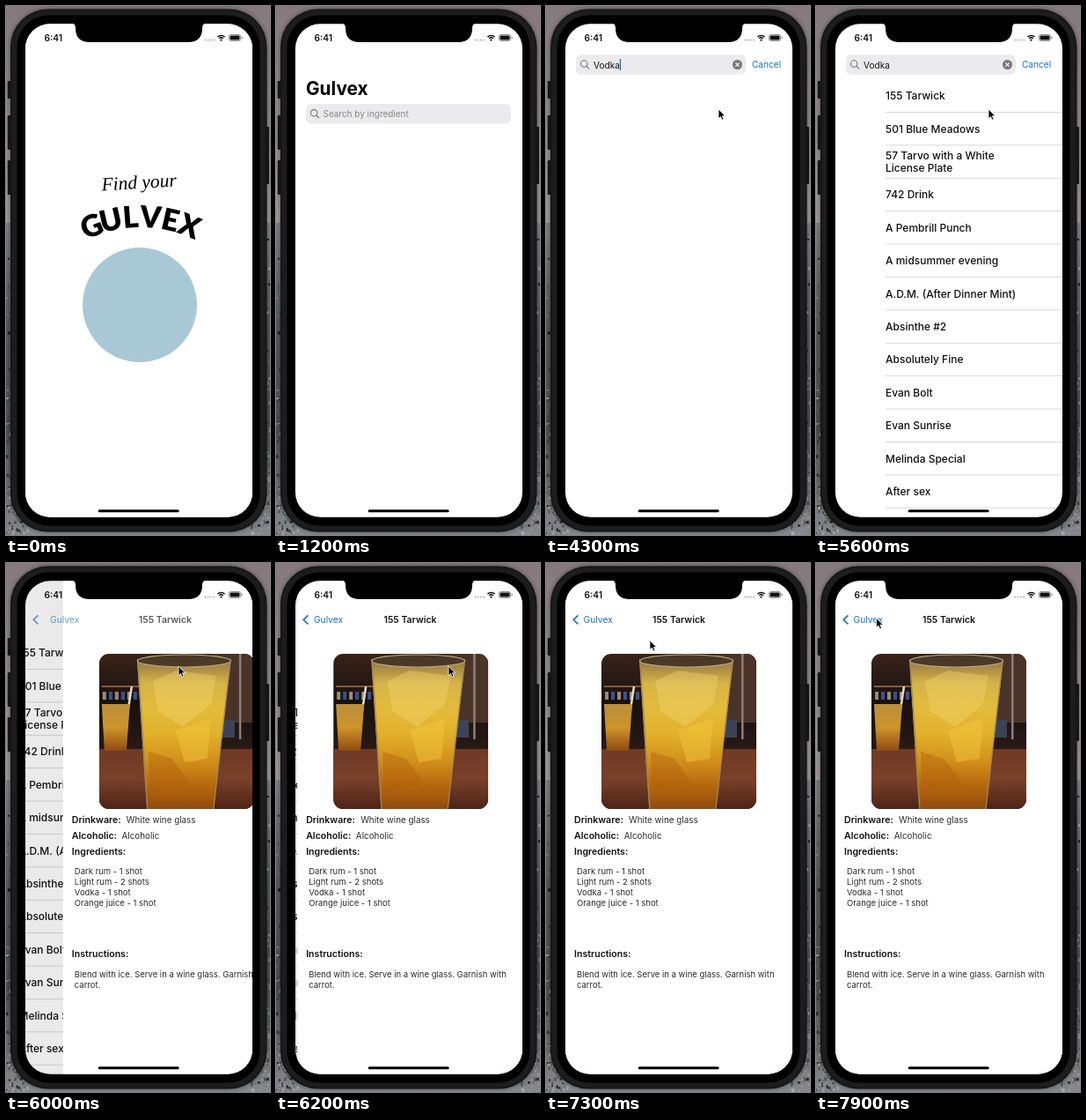
Animation of 300 by 600 pixels, one loop 8 s. Source, as an HTML page with a canvas:

```html
<!DOCTYPE html>
<html lang="en">
<head>
<meta charset="utf-8">
<title>Drink finder demo</title>
<style>
  html, body { margin: 0; width: 100%; height: 100%; overflow: hidden; background: #000; }
  canvas { display: block; width: 300px; height: 600px; }
</style>
</head>
<body>
<canvas id="stage"></canvas>
<script>
const canvas = document.getElementById('stage');
const g = canvas.getContext('2d');
const dpr = window.devicePixelRatio || 1;
canvas.width = 300 * dpr;
canvas.height = 600 * dpr;

const LOOP = 8000, STEP = 100;
const SANS = 'Inter, Roboto, sans-serif';
const BLUE = '#1a70c7', INK = '#111113', SOFT = '#2b2b2d';
const APP = 'Gulvex', DRINK = '155 Tarwick';
const SCREEN = { x: 22, y: 20.3, w: 258, h: 559.4 };
const ROWS = [
  DRINK, '501 Blue Meadows', '57 Tarvo with a White|License Plate', '742 Drink',
  'A Pembrill Punch', 'A midsummer evening', 'A.D.M. (After Dinner Mint)', 'Absinthe #2',
  'Absolutely Fine', 'Evan Bolt', 'Evan Sunrise', 'Melinda Special', 'After sex'
];

const clamp = v => Math.max(0, Math.min(1, v));
const mix = (a, b, p) => a + (b - a) * p;
const smooth = p => p * p * (3 - 2 * p);
function seeded(seed) {
  return () => (seed = seed * 16807 % 2147483647) / 2147483647;
}

function rect(x, y, w, h, color) {
  g.fillStyle = color;
  g.fillRect(x, y, w, h);
}
function roundPath(x, y, w, h, r) {
  g.beginPath();
  g.roundRect(x, y, w, h, r);
}
function round(x, y, w, h, r, color) {
  roundPath(x, y, w, h, r);
  g.fillStyle = color;
  g.fill();
}
function disc(x, y, r, color) {
  g.beginPath();
  g.arc(x, y, r, 0, 7);
  g.fillStyle = color;
  g.fill();
}
function polyPath(points) {
  g.beginPath();
  for (let i = 0; i < points.length; i += 2) g.lineTo(points[i], points[i + 1]);
}
function poly(points, color) {
  polyPath(points);
  g.closePath();
  g.fillStyle = color;
  g.fill();
}
function line(points, color, width) {
  polyPath(points);
  g.strokeStyle = color;
  g.lineWidth = width;
  g.stroke();
}
function text(s, x, y, size, weight = 400, color = INK, align = 'left') {
  g.font = `${weight} ${size}px ${SANS}`;
  g.textAlign = align;
  g.fillStyle = color;
  g.fillText(s, x, y);
}
function gradient(y0, y1, ...colors) {
  const fill = g.createLinearGradient(0, y0, 0, y1);
  colors.forEach((c, i) => fill.addColorStop(i / (colors.length - 1), c));
  return fill;
}
function faded(alpha, draw) {
  if (alpha <= 0) return;
  g.save();
  g.globalAlpha *= alpha;
  draw();
  g.restore();
}

function wallpaper() {
  rect(0, 0, 300, 600, gradient(0, 250, '#85797d', '#91878b', '#a0989b'));
  rect(0, 246, 300, 354, gradient(246, 600, '#7d8083', '#55585c', '#4c4f53', '#85898d'));
  const random = seeded(7);
  for (let i = 0; i < 520; i++) {
    const y = 250 + Math.sqrt(random()) * 350;
    const x = random() < .5 ? random() * 26 : 274 + random() * 26;
    const v = 25 + random() * 150 | 0;
    rect(x, y, 1 + random() * 2, 1 + random() * 3, `rgb(${v},${v + 2},${v + 5})`);
  }
}

function phone() {
  for (const [y, h] of [[85, 20], [124, 39], [175, 39]]) round(1.8, y, 6, h, 1, '#19191a');
  round(293, 137, 6, 65, 1, '#19191a');
  g.save();
  g.shadowColor = 'rgba(0,0,0,.45)';
  g.shadowBlur = 5 * dpr;
  round(5, 3.5, 291.5, 593, 43, '#171718');
  g.restore();
  round(7, 5.5, 287.5, 589, 41, '#1d1d1e');
  round(12.5, 10.5, 276, 579, 36, '#000');
  round(SCREEN.x, SCREEN.y, SCREEN.w, SCREEN.h, 28, '#fff');
}

function notchAndStatus() {
  g.beginPath();
  g.moveTo(74, 19);
  g.quadraticCurveTo(79, 20, 79, 25);
  g.quadraticCurveTo(79, 41, 95, 41);
  g.lineTo(207, 41);
  g.quadraticCurveTo(223, 41, 223, 25);
  g.quadraticCurveTo(223, 20, 228, 19);
  g.fillStyle = '#000';
  g.fill();
  text('6:41', 43.5, 39.8, 10.2, 600);
  for (let i = 0; i < 4; i++) disc(226.3 + i * 3.3, 38.6, 1.1, '#b9b9bc');
  g.strokeStyle = INK;
  g.lineWidth = 1.5;
  for (const r of [3.2, 5.7]) {
    g.beginPath();
    g.arc(244.5, 39.2, r, -2.35, -.79);
    g.stroke();
  }
  disc(244.5, 38.7, 1.1, INK);
  roundPath(253.4, 32.5, 13.2, 7, 2);
  g.strokeStyle = '#77777a';
  g.lineWidth = .8;
  g.stroke();
  round(254.5, 33.6, 11, 4.8, 1, INK);
  rect(267.6, 34.8, 1, 2.4, '#77777a');
  round(104.7, 571.3, 92, 3, 1.5, '#000');
}

function splash() {
  rect(SCREEN.x, SCREEN.y, SCREEN.w, SCREEN.h, '#fff');
  g.textAlign = 'center';
  g.fillStyle = '#000';
  g.save();
  g.translate(151.5, 207);
  g.rotate(-.06);
  g.font = 'italic 21.5px "Liberation Serif", "Noto Serif", serif';
  g.fillText('Find your', 0, 0);
  g.restore();
  const R = 140;
  g.font = '900 34px Lato, sans-serif';
  [...APP.toUpperCase()].forEach((c, i) => {
    g.save();
    g.translate(153, 251 + R);
    g.rotate((i - 2.5) * .15);
    g.fillText(c, 0, -R);
    g.restore();
  });
  disc(152, 339, 65, '#a9c8d6');
}

function searchField(t, p) {
  const y = mix(111, 55.2, p), w = mix(233, 193, p), mid = y + 11.3;
  const word = 'Vodka'.slice(0, clamp((t - 3800) / 500) * 5);
  round(34, y, w, 22.6, 6, t >= 2800 && t < 3000 ? '#dedde0' : '#ebeaed');
  g.strokeStyle = '#77777b';
  g.lineWidth = 1.1;
  g.beginPath();
  g.arc(43.2, mid - 1, 3.7, 0, 7);
  g.stroke();
  line([45.9, mid + 1.7, 49, mid + 4.8], '#77777b', 1.2);
  if (word) {
    text(word, 54, mid + 4, 10.1);
  } else {
    text('Search by ingredient', 53.5, mid + 3.8, 9.95, 400, '#87878b');
  }
  const caret = word ? 54 + g.measureText(word).width : 53;
  if (t >= 3000 && t < 4900) rect(caret, mid - 6.5, 1.2, 13, BLUE);
  if (word) {
    disc(217.5, mid, 5.5, '#78787c');
    line([215.4, mid - 2.1, 219.6, mid + 2.1], '#fff', 1.1);
    line([219.6, mid - 2.1, 215.4, mid + 2.1], '#fff', 1.1);
  }
  faded(p, () => text('Cancel', mix(274, 234, p), mid + 3.6, 10.1, 400, BLUE));
}

function list() {
  const H = 37.4;
  ROWS.forEach((name, i) => {
    const top = 83.2 + i * H, parts = name.split('|');
    parts.forEach((s, j) =>
      text(s, 79, top + 23 + (j - (parts.length - 1) / 2) * 14, 12, 500));
    rect(79, top + H - .5, 202, .7, '#c9c9cc');
  });
}

function home(t, push) {
  const p = smooth(clamp((t - 2950) / 450));
  g.save();
  g.translate(-.3 * SCREEN.w * push, 0);
  faded(1 - p * 1.6, () => text(APP, 34, 100.5 - 40 * p, 20.8, 700, '#000'));
  faded(clamp(1 - 2 * push), () => searchField(t, p));
  if (t >= 5600) list();
  g.restore();
  if (push) rect(SCREEN.x, SCREEN.y, SCREEN.w, SCREEN.h, `rgba(0,0,0,${.1 * push})`);
}

// a simplified bar scene: shelves, table, a small and a large glass
function photo() {
  g.save();
  roundPath(63, 103, 176, 176, 11);
  g.clip();
  rect(63, 103, 176, 176, gradient(103, 215, '#3a2218', '#17110f', '#2a1a15'));
  rect(63, 211, 176, 68, gradient(211, 279, '#6f3a25', '#7a4029', '#4c2417'));
  rect(66, 139, 44, 2, '#8b5a2c');
  for (let i = 0; i < 6; i++) rect(67 + i * 7, 146, 4, 9, i % 2 ? '#39518f' : '#9a8a76');
  rect(191, 103, 48, 78, '#4a3328');
  rect(203, 178, 14, 20, '#3c4257');
  rect(222, 103, 2.5, 97, '#8b8079');
  line([100, 140, 96, 166], '#e4dccb', 2.5);
  poly([66, 160, 98, 160, 94, 213, 69, 213], gradient(160, 213, '#b98f3c', '#cf932a', '#8f4b12'));
  poly([106, 109, 213, 109, 193, 280, 117, 280],
    gradient(108, 280, '#8c7342', '#d6b348', '#e3bb3a', '#e2b02c', '#d3921c', '#b8690f', '#8f4a0d'));
  poly([124, 134, 150, 122, 196, 128, 190, 160, 158, 186, 130, 168], 'rgba(240,212,110,.4)');
  poly([150, 190, 190, 176, 186, 222, 160, 226], 'rgba(244,200,60,.45)');
  poly([119, 214, 146, 222, 166, 250, 120, 262], 'rgba(176,92,14,.4)');
  g.beginPath();
  g.ellipse(159.5, 111, 53, 7, 0, 0, 7);
  g.fillStyle = '#4b3826';
  g.fill();
  g.strokeStyle = '#b5a684';
  g.lineWidth = 1.2;
  g.stroke();
  line([107, 113, 118, 279], '#a08652', 1.3);
  line([212, 113, 193, 279], '#a08652', 1.3);
  g.restore();
}

function detail(push) {
  const rest = 1 - push;
  const label = (s, y) => text(s, 32, y, 10.6, 600);
  const lines = (y, ...rows) =>
    rows.forEach((s, i) => text(s, 35, y + i * 12, 9.5, 400, SOFT));
  g.save();
  g.translate(SCREEN.w * rest, 0);
  rect(SCREEN.x, SCREEN.y, SCREEN.w, SCREEN.h, '#fff');
  photo();
  label('Drinkware:', 295);
  text('White wine glass', 94, 295, 9.85, 400, SOFT);
  label('Alcoholic:', 313);
  text('Alcoholic', 88.7, 313, 9.85, 400, SOFT);
  label('Ingredients:', 331);
  lines(353.3, 'Dark rum - 1 shot', 'Light rum - 2 shots', 'Vodka - 1 shot', 'Orange juice - 1 shot');
  label('Instructions:', 447.3);
  lines(469.8, 'Blend with ice. Serve in a wine glass. Garnish with', 'carrot.');
  g.restore();

  // the bar's contents travel less than the page
  faded(push * push, () => {
    line([36.5, 59.3, 31.2, 64.3, 36.5, 69.3], BLUE, 1.6);
    text(APP, 42.5 + 45 * rest, 68, 10.3, 400, BLUE);
    text(DRINK, 151 + 180 * rest, 68, 10.5, 600, INK, 'center');
  });
}

function cursorAt(t) {
  const keys = [[1800, 110, 640], [2300, 196, 117], [6400, 196, 117], [6700, 167.5, 113], [7900, 68.5, 62.5]];
  const i = Math.max(1, keys.findIndex(k => t <= k[0]));
  const [a, b] = [keys[i - 1], keys[i]];
  let p = clamp((t - a[0]) / (b[0] - a[0]));
  if (i === 1) p = 1 - (1 - p) ** 2;
  return [mix(a[1], b[1], p), mix(a[2], b[2], p)];
}
function cursor(t) {
  g.save();
  g.translate(...cursorAt(t));
  poly([0, 0, 0, 10.6, 2.5, 8.4, 4.1, 12.2, 6, 11.4, 4.4, 7.7, 7.7, 7.7], '#000');
  g.strokeStyle = '#fff';
  g.lineWidth = .8;
  g.stroke();
  g.restore();
}

// critically damped slide
function pushAt(t) {
  const s = Math.max(0, t - 5820) * .018;
  return t >= 6400 ? 1 : 1 - (1 + s) * Math.exp(-s);
}

function render(t) {
  g.setTransform(dpr, 0, 0, dpr, 0, 0);
  wallpaper();
  phone();
  g.save();
  roundPath(SCREEN.x, SCREEN.y, SCREEN.w, SCREEN.h, 28);
  g.clip();
  const push = pushAt(t);
  if (push < 1) home(t, push);
  if (push > 0) detail(push);
  faded(clamp(1 - (t - 200) / 300), splash);
  g.restore();
  notchAndStatus();
  if (t >= 1900) cursor(t);
}

const start = performance.now();
function tick() {
  const t = (performance.now() - start) % LOOP;
  render(Math.floor(t / STEP) * STEP);
  requestAnimationFrame(tick);
}
tick();
</script>
</body>
</html>
```
